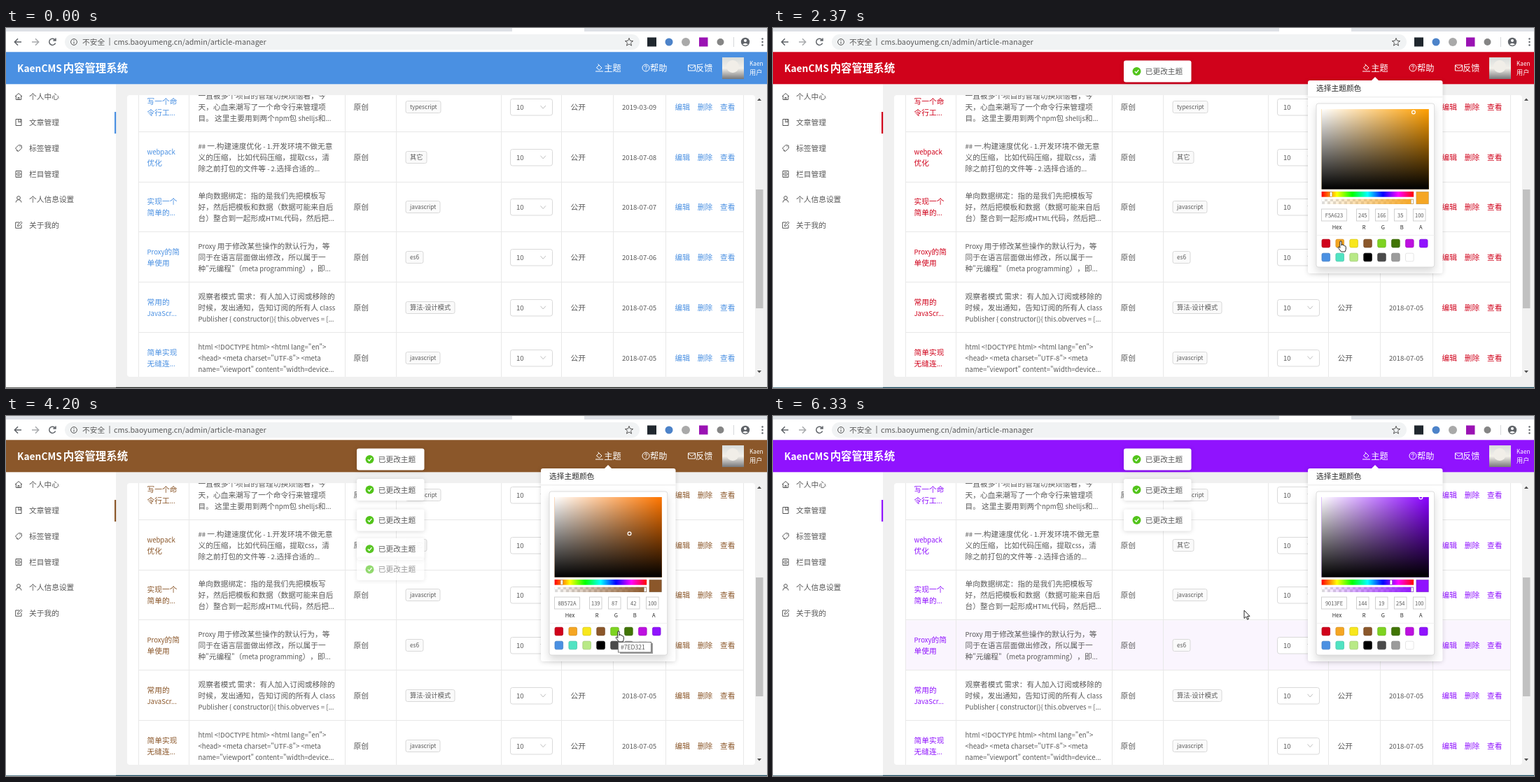
An HTML page that plays this animation: 1087x515 px, repeating every 6.36 s.

```html
<!DOCTYPE html>
<html lang="zh-CN">
<head>
<meta charset="utf-8">
<title>主题切换</title>
<style>
html, body { margin: 0; width: 100%; height: 100%; overflow: hidden; }
svg { display: block; width: 100%; height: 100%; font-family: "Noto Sans CJK SC", "Noto Sans CJK", sans-serif; }
text { white-space: pre; text-spacing-trim: space-all; fill: #595959; }
tspan { font-size: .895em; }
.raw tspan { font-size: 1em; }
.white { fill: #fff; }
.dark { fill: #262626; }
.head { fill: var(--head); }
.link { fill: var(--link); }
.line { fill: none; stroke: #555; stroke-width: 1; }
.glyph { fill: none; stroke: #fff; stroke-width: 1; }
.nav { fill: none; stroke: #5f6368; stroke-width: 1.5; }
.grid { fill: none; stroke: #e8e8e8; }
.box { fill: #fff; stroke: #d9d9d9; }
.raised { fill: #fff; filter: drop-shadow(0 1.5px 3px rgba(0,0,0,.15)); }
.panel { fill: #fff; stroke: #d4d4d4; stroke-width: .8; filter: drop-shadow(0 6px 6px rgba(0,0,0,.15)); }
</style>
</head>
<body>
<svg id="stage" viewBox="0 0 1087 515" preserveAspectRatio="none"></svg>
<script>
const LOOP = 6360, FONT = 10.72, ROW = 71.7;
const stage = document.getElementById('stage');
const escapes = { '&': '&amp;', '<': '&lt;', '>': '&gt;' };

// Latin runs are set slightly smaller than the Chinese characters around them.
const text = (x, y, string, size = FONT, attrs = '') =>
  `<text x="${x}" y="${y}" font-size="${size}" ${attrs}>${string.replace(/[\x20-\x7e]+/g,
    run => `<tspan>${run.replace(/[&<>]/g, c => escapes[c])}</tspan>`)}</text>`;
const rect = (x, y, w, h, attrs = '') =>
  `<rect x="${x}" y="${y}" width="${w}" height="${h}" ${attrs}/>`;
const path = (d, attrs = 'class="line"') => `<path d="${d}" ${attrs}/>`;
const circle = (x, y, r, attrs) => `<circle cx="${x}" cy="${y}" r="${r}" ${attrs}/>`;
const gradient = (id, stops, attrs = '') => `<linearGradient id="${id}" ${attrs}>${stops.map(([color, opacity = 1], i) =>
  `<stop offset="${i / (stops.length - 1)}" stop-color="${color}" stop-opacity="${opacity}"/>`).join('')}</linearGradient>`;

const vertical = 'x2="0" y2="1"';
const defs = `<defs>
  ${gradient('whiten', [['#fff'], ['#fff', 0]])}
  ${gradient('darken', [['#000', 0], ['#000']], vertical)}
  ${gradient('hues', ['#f00', '#ff0', '#0f0', '#0ff', '#00f', '#f0f', '#f00'].map(c => [c]))}
  ${gradient('fade', [['var(--pick)', 0], ['var(--pick)']])}
  ${gradient('portrait', [['#d8dcdb'], ['#f3f0ea'], ['#77787a']], vertical)}
  <pattern id="checks" width="8" height="8" patternUnits="userSpaceOnUse">
    <path d="M0 0H8V8H0z" fill="#fff"/><path d="M0 0H4V4H0zM4 4H8V8H4z" fill="#ddd"/></pattern>
  <clipPath id="card">${rect(173, 96, 897, 403, 'rx="4"')}</clipPath></defs>`;

const browser = rect(0, 0, 1087, 35, 'fill="#fff"') +
  rect(0, 0, 723, 5, 'fill="#dee1e6"') + rect(826, 0, 261, 5, 'fill="#dee1e6"') +
  rect(84, 9, 821, 22, 'rx="11" fill="#f1f3f4"') +
  path('M22 20H12.5M17 15.2L12.3 20L17 24.8', 'class="nav"') +
  path('M37 20H46.5M42 15.2L46.7 20L42 24.8', 'class="nav" opacity=".55"') +
  path('M70 17A4.6 4.6 0 1 0 70.6 21.5M71 14.5V18H67.3', 'class="nav"') +
  circle(97, 20, 4.4, 'class="line"') + path('M97 19.5V22.6M97 17V18.2') +
  text(109, 24, '不安全') + rect(147.5, 14, 1, 11, 'fill="#777"') +
  text(154, 24, 'cms.baoyumeng.cn/admin/article-manager', FONT, 'class="raw"') +
  path('M890 14.5L891.6 18.3L895.6 18.6L892.5 21.2L893.5 25.2L890 23L886.5 25.2L887.5 21.2L884.4 18.6L888.4 18.3Z') +
  rect(916, 13.5, 13, 13, 'fill="#20272e"') + circle(947, 20, 5.5, 'fill="#4d83c9"') +
  circle(971, 20, 6, 'fill="#a9a9a9"') + rect(990, 13.5, 12.5, 13, 'fill="#9a12b3"') +
  circle(1020.5, 20, 5, 'fill="#858585"') + rect(1039, 13, 1, 14, 'fill="#d5d7da"') +
  circle(1056, 20, 6.2, 'fill="#5f6368"') + circle(1056, 18, 2, 'class="white"') +
  path('M1052 23.5Q1056 20 1060 23.5L1056 25z', 'class="white"') +
  [15.5, 20, 24.5].map(y => circle(1080.5, y, 1.2, 'fill="#5f6368"')).join('');

const header = rect(0, 34.3, 1087, 46, 'class="head"') +
  text(16, 63, 'KaenCMS', 15.4, 'class="white" font-weight="700"') +
  text(81.7, 63, '内容管理系统', 15.4, 'class="white" font-weight="700"') +
  path('M843.5 57L847 53L851 57L847.5 60Zm2-5.5l2.5 2.5M842 62H853', 'class="glyph"') +
  text(854.3, 61.5, '主题', 12.2, 'class="white"') +
  circle(914, 57, 5, 'class="glyph"') +
  path('M912.3 55.8Q912.5 54 914.2 54T915.7 55.6Q915.5 56.6 914 57.5V58.3M914 59.2V60.2', 'class="glyph"') +
  text(920, 61.5, '帮助', 12.2, 'class="white"') +
  path('M974.5 53H984.5V61H974.5ZM974.5 53.8L979.5 57.8L984.5 53.8', 'class="glyph"') +
  text(985, 61.5, '反馈', 12.2, 'class="white"') +
  rect(1023, 42, 31, 31, 'fill="url(#portrait)"') +
  circle(1038, 55, 9, 'fill="#f1eee8"') +
  text(1062, 54, 'Kaen', 9.2, 'class="white"') + text(1062, 67, '用户', 9.2, 'class="white"');

const menu = [
  ['个人中心', 'M-5 0L0-4.5L5 0M-3.7-1V4.5H3.7V-1M-1 4.5V1.5H1V4.5'],
  ['文章管理', 'M-4-4.5H4V4.5H-4ZM0-4.5V0L1.5-1L3 0V-4.5'],
  ['标签管理', 'M-4.5 0L0-4.5L4-4L4.5 0L-.5 4.5ZM1.5-2.2h1M-3 3L-1.5 4.5'],
  ['栏目管理', 'M-4-4.5H4V4.5H-4ZM-4 0H4M-2-2.2H2M-2 2.2H2'],
  ['个人信息设置', 'M-2.4-2A2.4 2.4 0 1 0 2.4-2A2.4 2.4 0 1 0-2.4-2M-4 4.5Q-3.5.6 0 .6T4 4.5'],
  ['关于我的', 'M1-4H-4.3V4.3H4V0M-1.5 1.5L-1-.8L3.4-5L5-3.4L.8 1Z']
];
const sidebar = rect(0, 80.3, 157, 434, 'class="white"') + menu.map(([label, icon], i) => {
  const y = Math.round(98.3 + 36.75 * i);
  return path(icon, `class="line" transform="translate(18 ${y})"`) + text(33, y + 4, label);
}).join('') + rect(155, 120, 2.2, 31, 'class="link"');

const articles = [
  [['写一个命', '令行工...'], ['一直被多个项目的管理切换烦恼着，今', '天，心血来潮写了一个命令行来管理项', '目。 这里主要用到两个npm包 shelljs和...'], 'typescript', 50, '2019-03-09'],
  [['webpack', '优化'], ['## 一.构建速度优化 - 1.开发环境不做无意', '义的压缩， 比如代码压缩，提取css，清', '除之前打包的文件等 - 2.选择合适的...'], '其它', 30, '2018-07-08'],
  [['实现一个', '简单的...'], ['单向数据绑定：指的是我们先把模板写', '好，然后把模板和数据（数据可能来自后', '台）整合到一起形成HTML代码，然后把...'], 'javascript', 49, '2018-07-07'],
  [['Proxy的简', '单使用'], ['Proxy 用于修改某些操作的默认行为，等', '同于在语言层面做出修改，所以属于一', '种"元编程"（meta programming），即...'], 'es6', 25, '2018-07-06'],
  [['常用的', 'JavaScr...'], ['观察者模式 需求：有人加入订阅或移除的', '时候，发出通知，告知订阅的所有人 class', 'Publisher { constructor(){ this.obverves = [...'], '算法-设计模式', 70, '2018-07-05'],
  [['简单实现', '无缝连...'], ['html <!DOCTYPE html> <html lang="en">', '<head> <meta charset="UTF-8"> <meta', 'name="viewport" content="width=device...'], 'javascript', 49, '2018-07-05']
];
const table = articles.map(([title, summary, tag, tagWidth, date], i) => {
  const y = 113 + ROW * i, base = Math.round(y + 4);
  return title.map((s, k) => text(201.5, base - 8 + 16 * k, s, FONT, 'class="link"')).join('') +
    summary.map((s, k) => text(274.5, base + 16 * (k - 1), s)).join('') +
    text(496.5, base, '原创') +
    rect(571, Math.round(y - 8) - .5, tagWidth, 17, 'rx="2.5" fill="#fafafa" stroke="#d9d9d9"') +
    text(577, base - 1, tag, 9.24) +
    rect(720.5, Math.round(y - 12) + .5, 60, 23.5, 'rx="3" class="box"') + text(729, base, '10') +
    path(`M763.5 ${y - 2}l3.7 4.2l3.7-4.2`, 'fill="none" stroke="#bfbfbf"') +
    text(806.5, base, '公开') + text(880, base, date) +
    ['编辑', '删除', '查看'].map((s, k) => text(955.5 + 32.3 * k, base, s, FONT, 'class="link"')).join('') +
    path(`M189 ${Math.round(y + 35.8) - .5}H1054`, 'class="grid"');
}).join('');
const content = rect(157, 80.3, 930, 434, 'fill="#f0f0f0"') + rect(173, 96, 897, 403, 'rx="4" class="white"') +
  `<g clip-path="url(#card)">${rect(189, 292.5, 865, 71.5, 'id="hover" fill="#faf5fe"')}` +
  path([189, 261, 484, 557, 707, 793, 867, 942, 1053].map(x => `M${x}.5 96V499`).join(''), 'class="grid"') +
  table + '</g>' + rect(1070, 96, 12, 403, 'fill="#f1f1f1"') + rect(1071, 231, 10.5, 170, 'fill="#c1c1c1"') +
  path('M1073 104L1076 100.5L1079 104ZM1073 490L1076 493.5L1079 490Z', 'fill="#505050"') +
  rect(0, 513.8, 1087, 1.2, 'id="taskbar"');

const swatches = ['D0021B', 'F5A623', 'F8E71C', '8B572A', '7ED321', '417505', 'BD10E0', '9013FE',
  '4A90E2', '50E3C2', 'B8E986', '000000', '4A4A4A', '9B9B9B', 'FFFFFF'];
const fields = [['Hex', 783.5, 36], ['R', 833.5, 17.5], ['G', 860.5, 17.5], ['B', 887.5, 17.5], ['A', 914.5, 17.5]];
const popover = `<g id="popover">
  <g class="raised">${rect(764, 75, 192.5, 276, 'rx="3"')}${path('M854.5 75.5L860 70L865.5 75.5Z', '')}</g>` +
  text(776, 90, '选择主题颜色', FONT, 'class="dark"') + rect(764, 98.3, 192.5, 1, 'fill="#e8e8e8"') +
  rect(776, 108, 168.7, 234, 'rx="3" class="panel"') +
  rect(783.6, 116, 153.2, 114.7, 'id="tint"') +
  ['whiten', 'darken'].map(id => rect(783.6, 116, 153.2, 114.7, `fill="url(#${id})"`)).join('') +
  circle(0, 0, 2.4, 'id="spot" fill="none" stroke="#fff" stroke-width="1.2"') +
  rect(783.6, 234, 131.5, 7.7, 'fill="url(#hues)"') + rect(783.6, 244.7, 131.5, 7.3, 'fill="url(#checks)"') +
  rect(783.6, 244.7, 131.5, 7.3, 'fill="url(#fade)"') +
  rect(0, 234.7, 3, 6.4, 'id="hueMark" class="white" stroke="#888" stroke-width=".4"') +
  rect(911.5, 245.3, 3, 6.1, 'class="white" stroke="#888" stroke-width=".4"') +
  rect(918.8, 234.3, 17.7, 17.5, 'style="fill:var(--pick)" stroke="#0003" stroke-width=".7"') +
  fields.map(([label, x, w]) => rect(x, 259, w, 17, 'fill="#fff" stroke="#ccc" stroke-width=".9"') +
    text(x + w / 2, 270.7, '', 8.4, 'class="value" text-anchor="middle"') +
    text(x + w / 2 + (w > 20 ? 4 : 2), 288, label, 8.4, 'class="dark" text-anchor="middle"')).join('') +
  rect(776, 296, 168.7, .8, 'fill="#eee"') +
  swatches.map((color, i) => rect(784 + 19.92 * (i % 8), 302.3 + 19.92 * (i >> 3), 11.6, 11.6,
    `rx="2" fill="#${color}" stroke="#${color}" stroke-width=".7"`) +
    rect(784 + 19.92 * (i % 8), 302.3 + 19.92 * (i >> 3), 11.6, 11.6,
      'rx="2" fill="none" stroke="#000" stroke-opacity=".15" stroke-width=".7"')).join('') + '</g>';

// Toasts: time shown, time dismissed
const toasts = [[2050, 5300], [3060, 5850], [3630, 6050], [4050, 9e9], [4135, 9e9], [5100, 9e9]];
const toastViews = toasts.map(() => `<g class="toast">${rect(501, 46.5, 96.5, 31, 'rx="3" class="raised"')}` +
  circle(519.5, 62, 6, 'fill="#52c41a"') + path('M516.8 62L518.9 64.2L522.4 59.8', 'class="glyph" style="stroke-width:1.3"') +
  text(531.7, 66, '已更改主题') + '</g>').join('');

const overlay = `<g id="tooltip">${rect(877, 325, 47, 15, 'fill="#0006"')}${rect(874.5, 323.5, 47, 14.5, 'fill="#fff" stroke="#767676"')}` +
  text(878, 334.2, '#7ED321', 9.6) + '</g><g id="cursor" stroke="#111" stroke-width=".9" fill="#fff">' +
  path('M0 0V11.5L2.7 9L4.6 13.2L6.4 12.4L4.5 8.4H8Z', 'id="arrow"') +
  path('M-1.2 1Q-1.2-.3 0-.3T1.2 1V6L1.4 4.8Q3.2 4.4 3.6 5.8Q5.2 5.5 5.5 6.8Q7.3 6.7 7.3 8.3V11.5L6.1 15H.6L-3.9 9.3Q-3.7 7.7-2.3 8.3L-1.2 9.5Z', 'id="hand"') + '</g>';

stage.innerHTML = defs + browser + content + sidebar + header + popover + toastViews + overlay;

// Color, then the times it reaches the picker, the header and the links
const themes = [['4A90E2', 0, 0, 0], ['D0021B', 1500, 1860, 2040], ['F5A623', 2330, 2480, 3030],
  ['F8E71C', 3150, 3300, 3540], ['8B572A', 3750, 3900, 4080], ['7ED321', 4350, 4470, 4710], ['9013FE', 5490, 5760, 6000]];
const [PICKER, HEADER, LINKS] = [1, 2, 3];
const themeAt = (part, t) => themes.filter(theme => theme[part] <= t).pop()[0];

// Cursor stops: time, x, y
const stops = [[150, 1073, 13], [600, 864, 58], [840, 864, 58], [1350, 792, 305], [2130, 792, 305], [2280, 811, 305],
  [2490, 811, 305], [2640, 835, 306], [2820, 835, 306], [2880, 829, 306], [3420, 829, 306], [3570, 850, 307],
  [3960, 850, 307], [4140, 875, 308], [4560, 875, 308], [4920, 904, 309], [5070, 904, 309], [5370, 926, 312],
  [5790, 926, 312], [6240, 673, 278]];

const $ = id => document.getElementById(id);
const values = [...stage.querySelectorAll('.value')], toastNodes = [...stage.querySelectorAll('.toast')];
const progress = (t, start, length) => Math.min(1, Math.max(0, (t - start) / length));
const easeOut = p => 1 - (1 - p) ** 3;
const show = (id, on) => $(id).style.display = on ? '' : 'none';
const set = (node, attrs) => Object.entries(attrs).forEach(([key, value]) => node.setAttribute(key, value));

function toHsv([r, g, b]) {
  const max = Math.max(r, g, b), d = max - Math.min(r, g, b);
  const sector = max === r ? (g - b) / d + 6 : max === g ? (b - r) / d + 2 : (r - g) / d + 4;
  return [sector % 6 / 6, d / max, max / 255];
}

function drawPicker(hex) {
  const rgb = [0, 2, 4].map(i => parseInt(hex.slice(i, i + 2), 16));
  const [h, s, v] = toHsv(rgb);
  set($('tint'), { fill: `hsl(${h * 360},100%,50%)` });
  set($('spot'), { cx: 783.6 + 153.2 * s, cy: 116 + 114.7 * (1 - v) });
  set($('hueMark'), { x: 782 + 131.5 * h });
  [hex, ...rgb, 100].forEach((value, i) => values[i].innerHTML = `<tspan>${value}</tspan>`);
}

function drawToasts(t) {
  let slot = 0;
  toasts.forEach(([start, end], i) => {
    const enter = easeOut(progress(t, start, 240)), stay = 1 - easeOut(progress(t, end, 220));
    set(toastNodes[i], { opacity: enter * stay, transform: `translate(0 ${43.5 * (slot + enter + stay - 2)})` });
    slot += stay;
  });
}

function drawCursor(t) {
  const next = stops.findIndex(stop => stop[0] > t);
  const b = stops.at(next), a = next < 0 ? b : stops[Math.max(0, next - 1)];
  const p = progress(t, a[0], b[0] - a[0] || 1), e = p * p * (3 - 2 * p);
  set($('cursor'), { transform: `translate(${a[1] + (b[1] - a[1]) * e} ${a[2] + (b[2] - a[2]) * e})` });
  const hand = t > 570 && t < 900 || t > 1290 && t < 5850;
  show('cursor', t >= 150);
  show('hand', hand);
  show('arrow', !hand);
}

function draw(t) {
  const pick = themeAt(PICKER, t), open = easeOut(progress(t, 570, 200));
  stage.style.setProperty('--pick', '#' + pick);
  stage.style.setProperty('--head', '#' + themeAt(HEADER, t));
  stage.style.setProperty('--link', '#' + themeAt(LINKS, t));
  drawPicker(pick);
  set($('popover'), { opacity: open, transform: `translate(860 70) scale(${.8 + .2 * open}) translate(-860 -70)` });
  set($('taskbar'), { fill: t < 810 ? '#222420' : '#164a60' });
  show('hover', t >= 6100);
  show('tooltip', t >= 4170 && t < 4350);
  drawToasts(t);
  drawCursor(t);
}

const begin = performance.now();
function tick() {
  draw((performance.now() - begin) % LOOP);
  requestAnimationFrame(tick);
}
tick();
</script>
</body>
</html>
```
